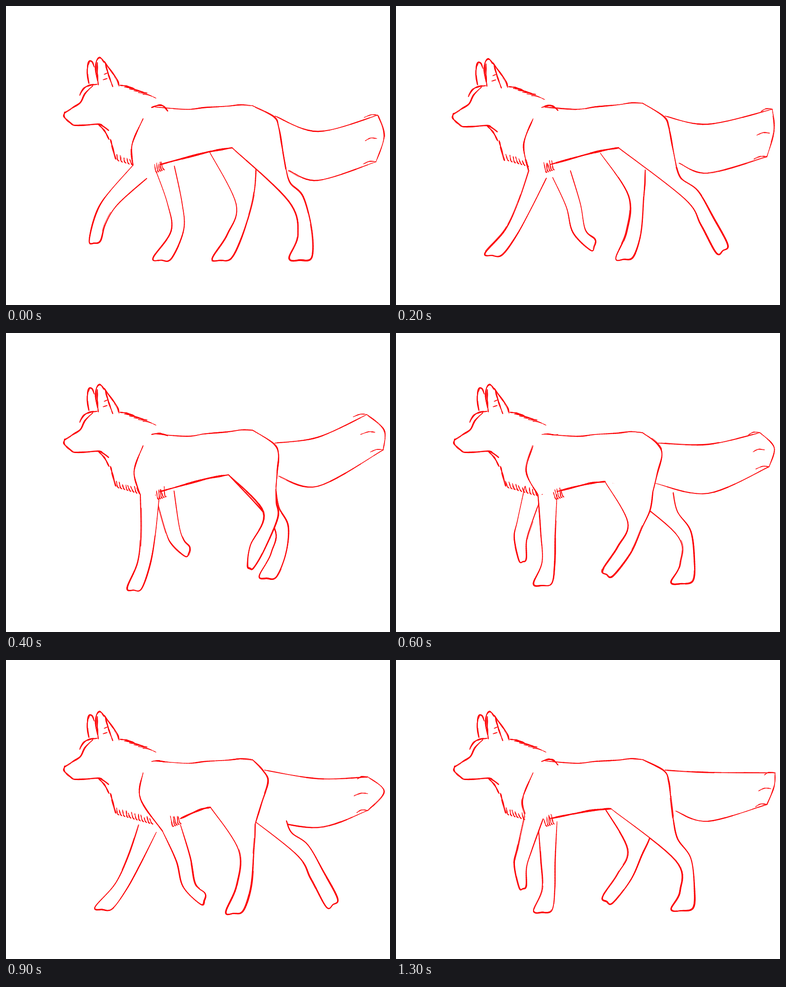
An HTML page with a canvas for the animation above (1.4 s loop, 849x660 px).

```html
<!DOCTYPE html>
<html lang="en">
<head>
<meta charset="utf-8">
<title>Wolf walk sketch</title>
<style>
  html, body { margin: 0; width: 100%; height: 100%; overflow: hidden; background: #fff; }
  canvas { display: block; }
</style>
</head>
<body>
<canvas id="stage" width="849" height="660"></canvas>
<script>
const ctx = document.getElementById('stage').getContext('2d');
const LOOP = 1400, STEP = 100, RED = '#fc0609';

const parse = s => s.split(' ').map(p => p.split(',').map(Number));
const track = keys => Object.entries(keys).map(([t, s]) => ({ t: +t, pts: parse(s) }));

// Joints of the near legs; the far legs walk the same cycle half a loop later.
// fore: top, knee, ankle, heel, toe
const fore = track({
  0: '296,366 233,430 208,474 209,518 184,519',
  200: '313,372 285,439 254,500 235,549 197,545',
  400: '318,358 314,445 305,508 300,564 268,562',
  600: '335,357 336,440 337,505 345,552 304,553',
  700: '352,359 373,435 379,495 366,557 325,556',
  900: '366,371 392,440 405,497 440,515 430,539',
  1100: '351,353 368,432 380,462 406,472 396,493',
  1300: '305,345 284,418 275,455 288,498 272,502'
});
// hind: groin, rump end, hock, ankle, heel, toe
const hind = track({
  0: '500,313 619,360 641,426 661,500 676,555 626,557',
  200: '492,313 620,355 653,417 688,475 733,526 708,545',
  400: '492,313 597,340 585,402 555,475 548,518 534,512',
  600: '462,328 568,350 528,424 505,478 480,536 457,522',
  700: '450,322 553,355 525,442 505,508 498,557 456,557',
  900: '452,325 551,362 531,420 526,498 525,553 486,556',
  1100: '492,313 597,345 607,425 603,485 598,538 560,536',
  1300: '475,328 613,352 635,440 644,507 657,547 608,550'
});
// tail: sag, upper tip, lower tip
const tail = track({
  0: '690,277 822,241 818,344',
  200: '690,261 832,228 820,333',
  400: '690,230 798,180 834,258',
  700: '690,254 808,240 820,314',
  900: '690,262 800,258 800,332',
  1100: '690,232 800,206 800,310',
  1300: '690,248 838,249 820,319'
});

const ears = [
  '183,171 180,150 181,130 185,121 191,124 195,135',
  '202,165 198,140 200,122 206,114 212,117 217,124',
  '204,174 202,150 202,125',
  '217,122 230,140 246,163 250,177',
  '219,125 226,150 236,178'
].map(parse);
const face = [
  '163,197 172,182 185,175 201,173',
  '192,176 175,193 164,213 148,224 129,236',
  '130,234 128,243 135,252 149,263',
  '141,257 150,263 175,263 205,261 215,266 227,275',
  '205,262 218,276 228,295',
  '231,294 235,310 243,338'
].map(parse);
const spine = parse('330,223 400,228 440,224 490,221 520,218 545,220');

let seed = 1;
const rnd = () => (seed = seed * 16807 % 2147483647) / 2147483647;
const spread = r => (rnd() * 2 - 1) * r;
const mix = (a, b, k) => a.map((v, i) => v + (b[i] - v) * k);
const add = ([x, y], dx, dy) => [x + dx, y + dy];

function poseAt(keys, time) {
  const t = time % LOOP;
  const i = keys.findLastIndex(k => k.t <= t);
  const a = keys[i], b = keys[(i + 1) % keys.length];
  const k = (t - a.t) / ((b.t || LOOP) - a.t);
  return a.pts.map((p, m) => mix(p, b.pts[m], k));
}

// Catmull-Rom samples through the points
function smooth(pts) {
  const out = [], last = pts.length - 1, N = 10;
  for (let i = 0; i < last; i++) {
    const a = pts[Math.max(i - 1, 0)], b = pts[i], c = pts[i + 1], d = pts[Math.min(i + 2, last)];
    for (let s = 0; s < N; s++) {
      const u = s / N;
      out.push([0, 1].map(q => b[q] + .5 * u * (c[q] - a[q]
        + u * (2 * a[q] - 5 * b[q] + 4 * c[q] - d[q]
        + u * (3 * (b[q] - c[q]) + d[q] - a[q])))));
    }
  }
  out.push(pts[last]);
  return out;
}

function trace(line, dx = 0, dy = 0) {
  ctx.beginPath();
  line.forEach(([x, y]) => ctx.lineTo(x + dx, y + dy));
}

function mask(line) {
  trace(line);
  ctx.fillStyle = '#fff';
  ctx.fill();
}

// One line of varying weight, then lighter strokes retracing parts of it
function pencil(pts, w) {
  const line = smooth(pts), n = line.length - 1, phase = rnd() * 6;
  ctx.strokeStyle = RED;
  for (let i = 0; i < n; i++) {
    const u = (i + .5) / n;
    ctx.lineWidth = w * (.55 + .45 * Math.sqrt(Math.sin(Math.PI * u))) * (.92 + .22 * Math.sin(u * 17 + phase));
    trace([line[i], line[i + 1]]);
    ctx.stroke();
  }
  ctx.globalAlpha = .7;
  ctx.lineWidth = w * .4;
  for (let g = 0; g < n / 12; g++) {
    const from = Math.floor(rnd() * n * .85);
    trace(line.slice(from, from + 11), spread(1.8), spread(1.4));
    ctx.stroke();
  }
  ctx.globalAlpha = 1;
}

// The two sides of joint p, square to the bone a-b
function sides(p, a, b, half) {
  const dx = b[0] - a[0], dy = b[1] - a[1], k = half / Math.hypot(dx, dy);
  return [add(p, -dy * k, dx * k), add(p, dy * k, -dx * k)];
}

const sole = (ankle, heel, toe) => {
  const m = mix(heel, toe, .5);
  return mix(m, ankle, -5 / Math.hypot(m[0] - ankle[0], m[1] - ankle[1]));
};

function foreLine(t) {
  const [top, knee, ankle, heel, toe] = poseAt(fore, t);
  const [b1, b2] = sides(top, top, knee, 21);
  const [k1, k2] = sides(knee, knee, ankle, 16);
  const [a1, a2] = sides(ankle, knee, ankle, 14);
  return [b1, k1, a1, toe, sole(ankle, heel, toe), heel, a2, k2, b2];
}

function hindLine(t) {
  const [groin, rump, hock, ankle, heel, toe] = poseAt(hind, t);
  const [k1, k2] = sides(hock, hock, ankle, 17);
  const [a1, a2] = sides(ankle, hock, ankle, 16);
  const thigh = add(mix(rump, k2, .5), (rump[0] - k2[0]) / 4, 0);
  return [rump, thigh, k2, a2, heel, sole(ankle, heel, toe), toe, a1, k1, groin];
}

function drawLeg(pts, w) {
  mask(smooth(pts));
  pencil(pts, w);
}

function drawTail(t, bulge, rump) {
  const [sag, up, low] = poseAt(tail, t);
  const under = add(sag, 0, 108);
  const tip = [836, (up[1] + low[1]) / 2 - 5];
  pencil([[bulge[0] - 8, 243], sag, up], 2.4);
  pencil([up, tip, low], 2.2);
  pencil([low, under, [rump[0] + 6, under[1] - 22]], 2.4);
  for (let i = 0; i < 3; i++) {
    const p = mix(up, low, i / 2);
    pencil([add(p, -28 + spread(5), 5), add(p, -14, -1), p], 1.6);
  }
}

// Short hairs hanging along the line a-b
function fur(a, b, count, len, w) {
  for (let i = 0; i < count; i++) {
    const p = mix(a, b, (i + .5) / count);
    pencil([add(p, spread(2) - 3, -len * (.6 + rnd() * .4)), p, add(p, 3, 3)], w);
  }
}

function drawHead(t) {
  const nod = 3 * Math.sin(Math.PI * Math.min(t, 400) / 400);
  seed = 77;
  ctx.save();
  ctx.translate(-nod, nod);
  ears.forEach(p => pencil(p, 2.8));
  face.forEach(p => pencil(p, 3));
  for (let i = 0; i < 2; i++) pencil([[215 + i * 2, 163 - i * 12], [224, 160 - i * 12]], 1.6);
  // mane, fading towards the withers
  for (let i = 0; i < 6; i++) {
    const x = 252 + i * 10, y = 175 + i * 4;
    pencil([[x, y], [x + 15, y + 2], [x + 30, y + 7 + spread(2)]], 2.6 - i * .25);
  }
  ctx.restore();
}

function draw(t) {
  seed = 31 + t * 7;
  ctx.fillStyle = '#fff';
  ctx.fillRect(0, 0, 849, 660);
  ctx.lineCap = ctx.lineJoin = 'round';

  const nearFore = foreLine(t), nearHind = hindLine(t);
  const chest = nearFore[0], elbow = nearFore.at(-1);
  const rumpEnd = nearHind[0], groin = nearHind.at(-1);
  const lift = 6.5 * Math.sin(Math.PI * Math.min(t, 600) / 600);
  const back = spine.map(([x, y], i) => [x, y - lift * Math.max(0, i - 1) / 4]);
  const bulge = [Math.min(603, 580 + (rumpEnd[0] - 552) / 2), 268];
  const rump = [back.at(-1), add(bulge, -11, -24), bulge, mix(bulge, rumpEnd, .5), rumpEnd];
  const shoulder = [[303, 249], [200 + .28 * chest[0], 306], chest];
  const armpit = [Math.max(341, elbow[0]), 350];
  const belly = [armpit, add(mix(armpit, groin, .65), 0, -3), groin];

  drawTail(t, bulge, rumpEnd);
  drawLeg(hindLine(t + LOOP / 2), 3.1);
  drawLeg(foreLine(t + LOOP / 2), 2.7);
  mask([...smooth(shoulder), ...smooth(belly), ...smooth(rump).reverse()]);
  drawLeg(nearHind, 3.4);
  drawLeg(nearFore, 3);

  pencil(back, 2.3);
  pencil(rump, 3);
  pencil(shoulder, 2.8);
  pencil(belly, 4);
  const hump = Math.cos(t / LOOP * 2 * Math.PI);
  pencil([[322, 224], [337, 221 - 2 * hump], [348, 223 - 2 * hump], [358, 228 + 4 * hump]], 2.6 + .6 * hump);

  const tuft = Math.min(372, Math.max(335, elbow[0]));
  fur([tuft - 6, 365], [tuft + 14, 358], 5, 20, 1.8);
  const ruff = Math.min(325, chest[0]);
  fur([243, 338], [ruff, 340 + (ruff - 243) / 4], Math.round((ruff - 243) / 7), 13, 1.9);
  drawHead(t);
}

let shown = -1;
function tick() {
  const t = Math.floor(performance.now() % LOOP / STEP) * STEP;
  if (t !== shown) draw(shown = t);
  requestAnimationFrame(tick);
}
tick();
</script>
</body>
</html>
```
